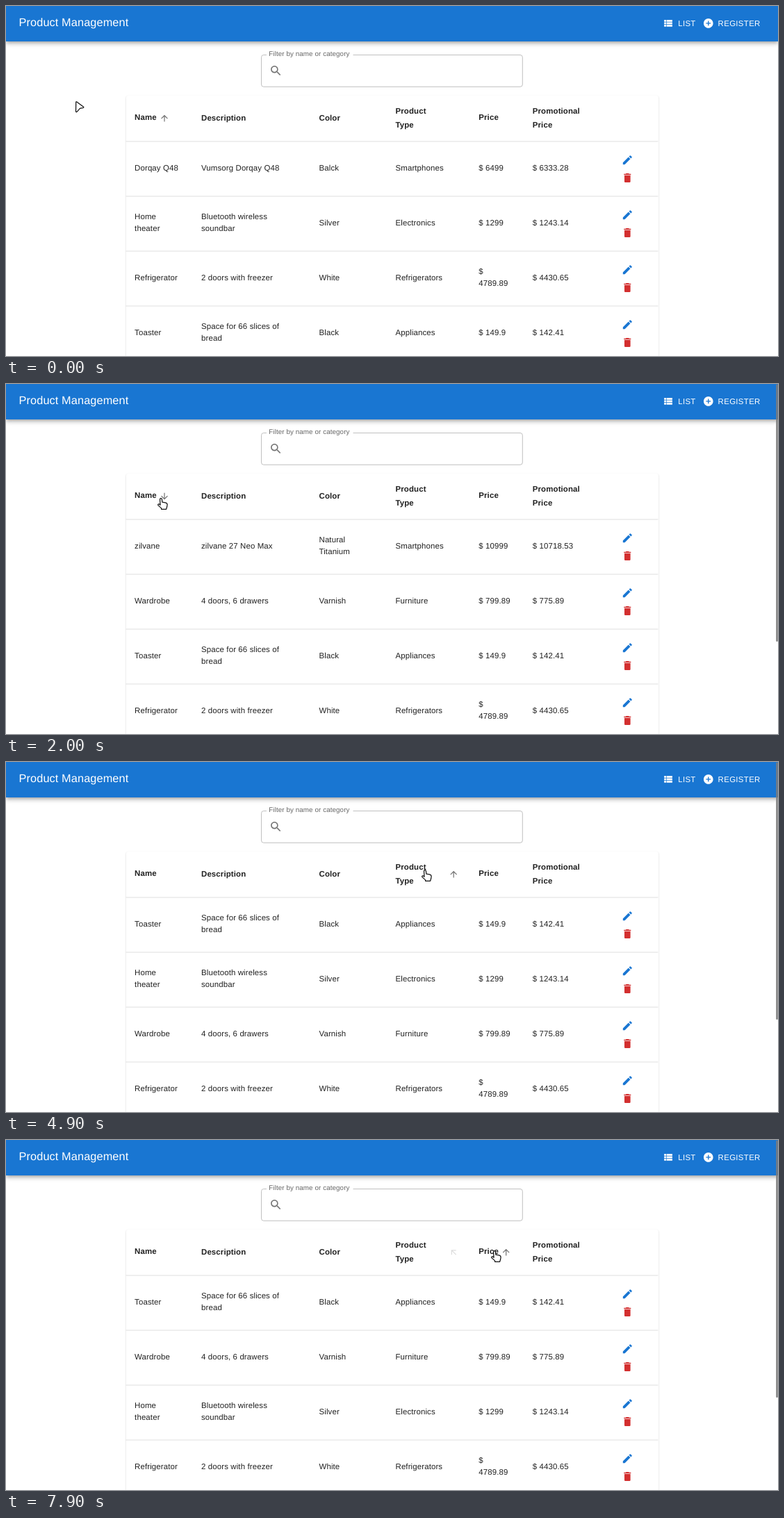
Recreate the animation shown at these times as an HTML page. Size 1111 by 504 pixels, loop 8000 ms.

```html
<!DOCTYPE html>
<html lang="en">
<head>
<meta charset="utf-8">
<title>Product table</title>
<style>
html, body { margin: 0; width: 100%; height: 100%; overflow: hidden; background: #fff; }
main { position: relative; width: 100%; height: 100%; overflow: hidden; contain: strict; }
.bar, .paper, svg { position: absolute; }
.bar {
  left: 0; top: 0; width: 100%; height: 51.4px; background: #1976d2;
  box-shadow: 0 2px 4px -1px rgba(0,0,0,.2), 0 4px 5px rgba(0,0,0,.14), 0 1px 10px rgba(0,0,0,.12);
}
.paper {
  left: 172.5px; top: 129px; width: 766px; bottom: 0; border-radius: 3.3px 3.3px 0 0; background: #fff;
  box-shadow: 0 2px 1px -1px rgba(0,0,0,.2), 0 1px 1px rgba(0,0,0,.14), 0 1px 3px rgba(0,0,0,.12);
}
svg { left: 0; top: 0; width: 100%; height: 100%; overflow: hidden; }
text {
  font: 11.45px "Liberation Sans", Arial, sans-serif; letter-spacing: .0107em;
  fill: #212121; text-rendering: geometricPrecision; white-space: pre;
}
.head text { font-weight: bold; }
.head .hover text { fill: #666; }
.title { font-size: 16.3px; letter-spacing: .0075em; fill: #fff; }
.nav { letter-spacing: .0286em; fill: #fff; }
.label { font-size: 9.8px; letter-spacing: .0094em; fill: #666; }
</style>
</head>
<body>
<main>
  <div class="bar"></div>
  <div class="paper"></div>
  <svg viewBox="0 0 1111 504" id="stage"></svg>
</main>
<script>
const LOOP = 8000, TICK = 100;
const COLS = [185.1, 281, 450.5, 560.5, 680.3, 757.8];
const ROW_TOP = 195, ROW_H = 79, ROWS = 4;
const GREY = "#757575";

const PRODUCTS = [
  ["zilvane", "zilvane 27 Neo Max", "Natural|Titanium", "Smartphones", "$ 10999", "$ 10718.53"],
  ["Dorqay Q48", "Vumsorg Dorqay Q48", "Balck", "Smartphones", "$ 6499", "$ 6333.28"],
  ["Home|theater", "Bluetooth wireless|soundbar", "Silver", "Electronics", "$ 1299", "$ 1243.14"],
  ["Refrigerator", "2 doors with freezer", "White", "Refrigerators", "$|4789.89", "$ 4430.65"],
  ["Toaster", "Space for 66 slices of|bread", "Black", "Appliances", "$ 149.9", "$ 142.41"],
  ["Wardrobe", "4 doors, 6 drawers", "Varnish", "Furniture", "$ 799.89", "$ 775.89"]
];

// Sortable headings: column, hover span, arrow centre
const HEADS = {
  name: { col: 0, from: 185, to: 235, arrow: 228 },
  type: { col: 3, from: 561, to: 651, arrow: 644.2 },
  price: { col: 4, from: 684, to: 727, arrow: 719.7 }
};
const SORTS = [
  { at: 0, key: "name", dir: 1 }, { at: 1800, key: "name", dir: -1 }, { at: 3100, key: "name", dir: 1 },
  { at: 4800, key: "type", dir: 1 }, { at: 5800, key: "type", dir: -1 }, { at: 7900, key: "price", dir: 1 }
];

// Pointer hot spot
const HOME = { x: 100.7, y: 137.5 };
const MOVES = [
  { from: 200, to: 1200, x: 223, y: 166 },
  { from: 1400, to: 1600, x: 223, y: 165 },
  { from: 3500, to: 4300, x: 603, y: 157 },
  { from: 4400, to: 4500, x: 603, y: 156 },
  { from: 6400, to: 7000, x: 702.5, y: 160.3 },
  { from: 7300, to: 7400, x: 703, y: 160 }
];

const ICONS = {
  search: "M15.5 14h-.79l-.28-.27C15.41 12.59 16 11.11 16 9.5 16 5.91 13.09 3 9.5 3S3 5.91 3 9.5 5.91 16 9.5 16c1.61 0 3.09-.59 4.23-1.57l.27.28v.79l5 4.99L20.49 19l-4.99-5zm-6 0C7.01 14 5 11.99 5 9.5S7.01 5 9.5 5 14 7.01 14 9.5 11.99 14 9.5 14z",
  edit: "M3 17.25V21h3.75L17.81 9.94l-3.75-3.75L3 17.25zM20.71 7.04c.39-.39.39-1.02 0-1.41l-2.34-2.34a1 1 0 0 0-1.41 0l-1.83 1.83 3.75 3.75 1.83-1.83z",
  bin: "M6 19c0 1.1.9 2 2 2h8c1.1 0 2-.9 2-2V7H6v12zM19 4h-3.5l-1-1h-5l-1 1H5v2h14V4z",
  list: "M4 14h4v-4H4v4zm0 5h4v-4H4v4zM4 9h4V5H4v4zm5 5h12v-4H9v4zm0 5h12v-4H9v4zM9 5v4h12V5H9z",
  add: "M12 2C6.48 2 2 6.48 2 12s4.48 10 10 10 10-4.48 10-10S17.52 2 12 2zm5 11h-4v4h-2v-4H7v-2h4V7h2v4h4v2z",
  up: "M4 12l1.41 1.41L11 7.83V20h2V7.83l5.58 5.59L20 12l-8-8-8 8z"
};

const text = (x, y, str, cls = "") => `<text x="${x}" y="${y}" class="${cls}">${str}</text>`;

// Icon centred at x, y
const icon = (name, x, y, scale, fill) =>
  `<path d="${ICONS[name]}" fill="${fill}" transform="translate(${x} ${y}) scale(${scale}) translate(-12 -12)"/>`;

// One or two lines around a middle baseline
const lines = (x, y, str, pitch) => {
  const parts = str.split("|");
  return parts.map((s, i) => text(x, y + (i - (parts.length - 1) / 2) * pitch, s)).join("");
};

const row = (cells, i) => {
  const mid = ROW_TOP + i * ROW_H + 38;
  return `<rect x="172.5" y="${ROW_TOP - .5 + i * ROW_H}" width="766" height="1" fill="#e0e0e0"/>` +
    cells.map((s, c) => lines(COLS[c], mid + 3.8, s, 16.7)).join("") +
    icon("edit", 894.3, mid - 11.3, .72, "#1976d2") +
    icon("bin", 894.3, mid + 14.6, .72, "#d32f2f");
};

document.getElementById("stage").innerHTML =
  text(18.5, 29.4, "Product Management", "title") +
  icon("list", 952.7, 24.9, .69, "#fff") + text(967.2, 28.6, "LIST", "nav") +
  icon("add", 1010.8, 24.9, .678, "#fff") + text(1024.6, 28.6, "REGISTER", "nav") +
  `<path d="M499.5 70.5H740a3.3 3.3 0 0 1 3.3 3.3V113a3.3 3.3 0 0 1-3.3 3.3H370.8a3.3 3.3 0 0 1-3.3-3.3V73.8a3.3 3.3 0 0 1 3.3-3.3H375" fill="none" stroke="#c0c0c0"/>` +
  text(378.3, 72.4, "Filter by name or category", "label") +
  icon("search", 388.4, 93.2, .8133, GREY) +
  `<g class="head">
    <g id="label-name">${text(COLS[0], 164.2, "Name")}</g>
    ${text(COLS[1], 164.9, "Description")}
    ${text(COLS[2], 164.9, "Color")}
    <g id="label-type">${lines(COLS[3], 165, "Product|Type", 19.5)}</g>
    <g id="label-price">${text(COLS[4], 164.2, "Price")}</g>
    ${lines(COLS[5], 165, "Promotional|Price", 19.5)}
  </g>` +
  Object.keys(HEADS).map(k => `<g id="sort-${k}">${icon("up", 0, 0, .61, GREY)}</g>`).join("") +
  `<g id="rows"></g>
  <rect id="thumb" x="1108.3" y=".5" width="2.4" height="370.5" rx="1.2"/>
  <g id="pointer" fill="#fff" stroke="#111" stroke-width="1.25" stroke-linejoin="round">
    <path id="plain" d="M0 1.1Q0-.2 1.1.5L10.8 7.7Q11.6 8.8 10.3 9.1L5.8 9.9 1.4 14.8Q0 15.8-.2 14.2Z"/>
    <path id="hand" d="M-1 8.6L-1.5 1.2Q-1.5-.3-.1-.3 1.2-.3 1.4 1.1L1.9 5.2 6.3 5.8Q9.2 6.3 9.1 9L8.6 12 7.6 15.4H.7L.4 13.6-3.9 9.9Q-4.8 8.7-3.7 8-2.8 7.5-1 9.2Z"/>
  </g>`;

const $ = id => document.getElementById(id);
const set = (id, name, value) => $(id).setAttribute(name, value);
const clamp = v => Math.min(1, Math.max(0, v));
const easeOut = (p, power) => 1 - (1 - p) ** power;

function pointAt(t) {
  let { x, y } = HOME;
  for (const m of MOVES) {
    const p = easeOut(clamp((t - m.from) / (m.to - m.from)), 1.5);
    x += (m.x - x) * p;
    y += (m.y - y) * p;
  }
  return { x, y };
}

function hoverAt(t) {
  const { x, y } = pointAt(t);
  return Object.keys(HEADS).find(k => y > 150 && x >= HEADS[k].from && x <= HEADS[k].to);
}

function sorted({ key, dir }) {
  const { col } = HEADS[key];
  const value = p => key === "price" ? parseFloat(p[col].replace(/[$| ]/g, "")) : p[col];
  const compare = (a, b) => value(a) < value(b) ? -1 : value(a) > value(b) ? 1 : 0;
  return [...PRODUCTS].sort((a, b) => dir * compare(a, b)).slice(0, ROWS);
}

// Active arrow turns down, a dropped one fades while turning back up, a hovered one is half lit
function arrowAt(key, t, now, before) {
  const p = easeOut(clamp((t - now.at + TICK) / (2 * TICK)), 2);
  if (now.key === key) return { angle: now.dir < 0 ? -180 * p : 0, opacity: 1 };
  if (before && before.key === key && p < 1)
    return { angle: before.dir < 0 ? -180 * (1 - p) : 0, opacity: 1 - p };
  const lit = [t, t - TICK].filter(u => hoverAt(u) === key).length;
  return { angle: 0, opacity: lit / 4 };
}

let shown;
function draw(t) {
  const step = SORTS.filter(s => s.at <= t).length - 1;
  const now = SORTS[step], hover = hoverAt(t), { x, y } = pointAt(t);
  if (now !== shown) {
    shown = now;
    $("rows").innerHTML = sorted(now).map(row).join("");
  }
  for (const key in HEADS) {
    const { angle, opacity } = arrowAt(key, t, now, SORTS[step - 1]);
    set("sort-" + key, "transform", `translate(${HEADS[key].arrow} 161.7) rotate(${angle})`);
    set("sort-" + key, "opacity", opacity);
    $("label-" + key).classList.toggle("hover", hover === key && now.key !== key);
  }
  const shade = 198 - 75 * clamp((t - 1400) / 200);
  set("thumb", "fill", `rgb(${shade} ${shade} ${shade})`);
  set("thumb", "opacity", t < 300 ? 0 : 1);
  set("pointer", "transform", `translate(${x} ${y})`);
  set("hand", "opacity", hover ? 1 : 0);
  set("plain", "opacity", hover ? 0 : 1);
}

const start = performance.now();
function frame() {
  const t = (performance.now() - start) % LOOP;
  draw(Math.floor(t / TICK) * TICK);
  requestAnimationFrame(frame);
}
frame();
</script>
</body>
</html>
```
